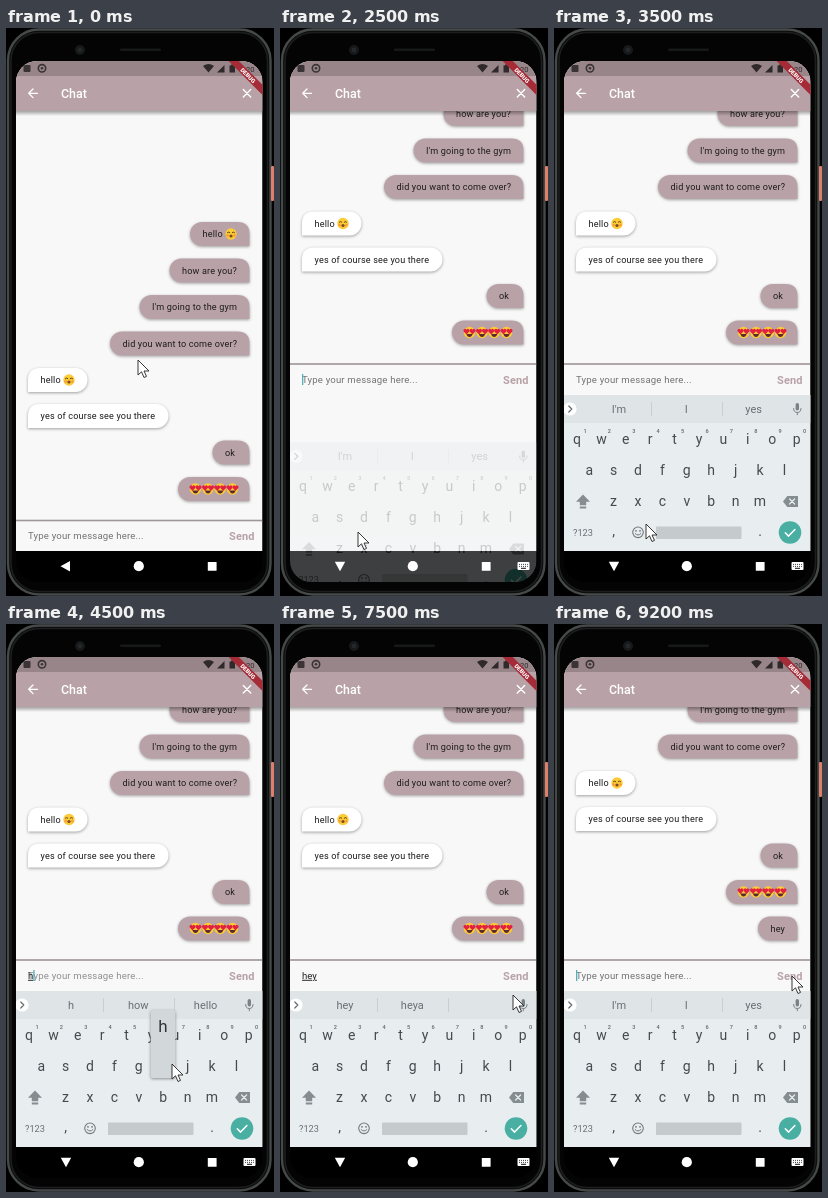
These frames come from a looping animation (268x568 px, 9300 ms). An HTML page:

```html
<!DOCTYPE html>
<html lang="en">
<head>
<meta charset="utf-8">
<title>Chat on a phone</title>
<style>
html, body { margin: 0; width: 100%; height: 100%; overflow: hidden; background: #000; }
svg { display: block; width: 268px; height: 568px; font-family: Roboto, Arial, sans-serif; }
.msg { font-size: 9.1px; letter-spacing: .16px; fill: #1d1b1c; }
.bubble { filter: drop-shadow(0 1.8px 1.5px rgba(0,0,0,.36)); }
.input { font-size: 9.6px; letter-spacing: .17px; }
.typed { fill: #222; text-decoration: underline; letter-spacing: 0; }
.mid { text-anchor: middle; }
.key { font-size: 14px; fill: #444b4e; }
.digit { font-size: 5.6px; fill: #62696c; font-weight: 500; }
.word { font-size: 11px; fill: #687074; }
.line { fill: none; stroke-linecap: round; stroke-linejoin: round; }
</style>
</head>
<body>
<svg id="stage" viewBox="0 0 268 568"></svg>
<script>
const LOOP = 9300, STEP = 100, LIFT = 156.5, ROW = 36.5;
const MAUVE = '#b8a2a8';
const stage = document.getElementById('stage');

// [time, x, y] of the mouse pointer
const POINTER = [
  [400, 132, 332], [500, 118, 375], [600, 92, 460], [700, 80, 516], [1200, 80, 516],
  [1400, 78, 504], [3400, 78, 504], [3500, 92, 496], [3700, 155, 447], [3800, 166, 440],
  [4500, 166, 440], [4600, 132, 428], [4800, 80, 412], [5700, 80, 412], [6000, 148, 411],
  [6100, 148, 411], [6200, 146, 409], [6800, 146, 409], [7300, 214, 385], [7400, 214, 385],
  [7500, 233, 371], [7700, 242, 357], [7800, 242, 357], [7900, 238, 352]
];
// [fade-in start, fade-out start] of the text caret
const CARET = [[1900, 3100], [3500, 4100], [4400, 5000], [5200, 6000], [6400, 7000], [7500, 7900], [8400, 9900]];
// [time, typed text, suggestions]
const TYPING = [
  [0, '', ["I'm", 'I', 'yes']],
  [4500, 'h', ['h', 'how', 'hello']],
  [5400, 'he', ['he', 'hello', 'hey']],
  [6600, 'hey', ['hey', 'heya', '']],
  [8500, '', ["I'm", 'I', 'yes']]
];
// [key, x, y, shown from, shown until]
const PRESSES = [['h', 157, 442, 4400, 4600], ['e', 71.5, 411, 5200, 5500], ['y', 145, 411, 6400, 6700]];

const clamp = v => Math.max(0, Math.min(1, v));
const ramp = (t, a, b) => clamp((t - a) / (b - a));
const text = (x, y, s, cls, extra = '') => `<text x="${x}" y="${y}" class="${cls}" ${extra}>${s}</text>`;
const rect = (x, y, w, h, fill, extra = '') => `<rect x="${x}" y="${y}" width="${w}" height="${h}" fill="${fill}" ${extra}/>`;
const dot = (x, y, r, fill, extra = '') => `<circle cx="${x}" cy="${y}" r="${r}" fill="${fill}" ${extra}/>`;
const path = (d, fill, extra = '') => `<path d="${d}" fill="${fill}" ${extra}/>`;
const stroke = (d, color, w) => `<path d="${d}" class="line" stroke="${color}" stroke-width="${w}"/>`;
const group = (attrs, body) => `<g ${attrs}>${body}</g>`;

function pointerAt(t) {
  const i = POINTER.findIndex(p => p[0] >= t);
  if (i < 0) return POINTER.at(-1).slice(1);
  if (i === 0) return POINTER[0].slice(1);
  const [a, x0, y0] = POINTER[i - 1], [b, x1, y1] = POINTER[i];
  const k = ramp(t, a, b);
  return [x0 + (x1 - x0) * k, y0 + (y1 - y0) * k];
}

const face = (x, y, body) => group(`transform="translate(${x} ${y})"`, dot(0, 0, 5.7, '#fccb35') + body);
const kiss = (x, y) => face(x, y,
  stroke('M-3.6 -1.4q1.2 -1.2 2.4 0M1.2 -1.4q1.2 -1.2 2.4 0', '#5b4124', 1) +
  dot(-3.4, 1.6, 1.4, '#f7a03a') + dot(3.4, 1.6, 1.4, '#f7a03a') +
  dot(0, 2, 1.6, '#7d4a24'));
const heart = x => path(`M${x} 2l-2.8 -3a1.5 1.5 0 0 1 2.8 -1.8a1.5 1.5 0 0 1 2.8 1.8z`, '#e2203f');
const love = (x, y) => face(x, y, heart(-3) + heart(3) + path('M-3 1.6h6q-.6 3 -3 3t-3 -3z', '#5a2a30'));

function bubble(x0, x1, y, words, mine, emoji = '') {
  const t = y - 12, b = y + 12;
  const d = mine
    ? `M${x0 + 12} ${t}H${x1 - 12}q12 0 12 12V${b}H${x0 + 12}a12 12 0 0 1 0 -24z`
    : `M${x0 + 12} ${t}H${x1 - 12}a12 12 0 0 1 0 24H${x0}V${y}q0 -12 12 -12z`;
  return path(d, mine ? MAUVE : '#fff', 'class="bubble"') + text(x0 + 12.5, y + 3.2, words, 'msg') + emoji;
}

const MESSAGES =
  bubble(184, 243.5, 206, 'hello', true, kiss(225, 206)) +
  bubble(163.5, 243.5, 242.5, 'how are you?', true) +
  bubble(133.5, 243.5, 279, 'I\'m going to the gym', true) +
  bubble(104, 243.5, 315.5, 'did you want to come over?', true) +
  bubble(22, 81.5, 352, 'hello', false, kiss(63, 352)) +
  bubble(22, 162.5, 388, 'yes of course see you there', false) +
  bubble(206.5, 243.5, 424.5, 'ok', true) +
  bubble(172, 243.5, 461, '', true, [189.5, 202, 214.2, 226.5].map(x => love(x, 461)).join(''));
const REPLY = bubble(204, 243.5, 461, 'hey', true);

const DEFS = `<defs>
  <clipPath id="screen"><rect x="10" y="33" width="246.5" height="521" rx="21"/></clipPath>
  <clipPath id="body"><rect x="10" y="83" width="246.5" height="440"/></clipPath>
  <linearGradient id="shade" x2="0" y2="1"><stop stop-opacity=".34"/><stop offset="1" stop-opacity="0"/></linearGradient>
</defs>`;

const PHONE = rect(0, 0, 268, 568, '#000') +
  rect(2, 1.5, 262.5, 565, '#0a0b0b', 'rx="31" stroke="#464949" stroke-width="2.4"') +
  rect(5, 4.5, 256.5, 559, '#040404', 'rx="28" stroke="#1d1e1e" stroke-width="1.6"') +
  dot(74, 22, 5, '#17191a') + dot(74, 22, 2.4, '#24282b') +
  rect(114, 20.5, 41, 2.5, '#171818', 'rx="1.2"') +
  rect(265, 138, 3, 35, '#dd7f6a', 'rx="1"');

const TOP_BAR = rect(10, 83, 246.5, 5, 'url(#shade)') +
  rect(10, 33, 246.5, 15, '#988589') + rect(10, 48, 246.5, 35, MAUVE) +
  rect(17.5, 37, 7, 7, '#3b3436', 'rx="1"') +
  dot(36, 40.3, 3.7, 'none', 'stroke="#3b3436" stroke-width="1.6"') + dot(36, 40.3, 1.3, '#3b3436') +
  path('M202.5 44.5l-5.5 -6.4q5.5 -4 11 0z', '#2f292b') +
  path('M211 44.5h7.5v-7.5z', '#2f292b') +
  path('M223.5 37.5h1.5v-1h2.5v1h1.5v7h-5.5z', '#2f292b') +
  text(234, 43.5, '5:20', '', 'font-size="7.6" fill="#2f292b"') +
  group('transform="translate(256.5 33) rotate(45)"',
    rect(-30, 16.8, 60, 7.2, '#a52b37') +
    text(0, 22.6, 'DEBUG', 'mid', 'font-size="5.8" font-weight="800" fill="#fff"')) +
  stroke('M31.5 65.3H22.8M27 61L22.7 65.3L27 69.6', '#fff', 1.3) +
  text(55, 69.8, 'Chat', '', 'font-size="12.4" font-weight="500" fill="#fff"') +
  stroke('M237.3 61.5l7.4 7.4M244.7 61.5l-7.4 7.4', '#fff', 1.4);

function keyRow(keys, x, y, digits) {
  return [...keys].map((k, i) => {
    const cx = x + i * 24.4;
    return text(cx, y + 4.5, k, 'key mid') + (digits ? text(cx + 8, y - 6, (i + 1) % 10, 'digit mid') : '');
  }).join('');
}

const KEYS = rect(10, 367, 246.5, 156, '#e8edef') + rect(10, 367, 246.5, 28, '#dfe4e7') +
  dot(16, 381, 6.6, '#fff') + stroke('M14.8 378l3 3l-3 3', '#666d70', 1.2) +
  rect(97, 374, .8, 14, '#c3c9cc') + rect(168, 374, .8, 14, '#c3c9cc') +
  rect(241.6, 375, 3.4, 7.5, '#7b8285', 'rx="1.7"') +
  stroke('M239.6 380.5q0 4 3.7 4t3.7 -4M243.3 384.5v2.3', '#7b8285', 1) +
  keyRow('qwertyuiop', 23, 411, true) + keyRow('asdfghjkl', 35.2, 442) + keyRow('zxcvbnm', 59.6, 473) +
  path('M29 466.5l7 7.2h-3.8v3.6h-6.4v-3.6h-3.8zM25.8 478.6h6.4v1.8h-6.4z', '#868d90') +
  path('M229 473.5l4.3 -5.5h10.7v11h-10.7z', '#868d90') +
  stroke('M235.6 471l5 5M240.6 471l-5 5', '#e8edef', 1.2) +
  text(29, 507.8, '?123', 'mid', 'font-size="9.2" fill="#687074"') +
  text(59.6, 508, ',', 'key mid') + text(206, 508, '.', 'key mid') +
  dot(84, 504.3, 5.3, 'none', 'stroke="#71787b" stroke-width="1.1"') +
  dot(82, 502.8, .9, '#71787b') + dot(86, 502.8, .9, '#71787b') + stroke('M81.2 505.6q2.8 3 5.6 0', '#71787b', 1) +
  rect(102, 498.5, 85.5, 12.5, '#c5cacc', 'rx="1"') +
  dot(236, 504.5, 11.3, '#4aafa3') + stroke('M231.3 504.8l3.3 3.3l6.3 -6.6', '#fff', 1.5);

function popup([k, x, y, from, until], t) {
  if (t < from || t > until) return '';
  return rect(x - 12.3, y - 56, 24.6, 68, '#d2d8da', 'rx="2" style="filter:drop-shadow(0 1px 1.5px rgba(0,0,0,.4))"') +
    text(x, y - 34.5, k, 'key mid', 'style="font-size:17px;fill:#2f3537"');
}

function chat(t, typed) {
  const sent = t >= 8500;
  const hint = t < 8000 ? 1 - ramp(t, 4450, 4680) : ramp(t, 8400, 8700);
  const caret = Math.max(...CARET.map(([on, off]) => Math.min(ramp(t, on, on + 100), 1 - ramp(t, off - 100, off + 100))));
  return group('clip-path="url(#body)"', group(`transform="translate(0 ${t >= 2500 ? -LIFT : 0})"`,
    group(`transform="translate(0 ${sent ? -ROW : 0})"`, MESSAGES) + (sent ? REPLY : '') +
    rect(10, 491.7, 246.5, 1.6, '#a0959a') +
    text(22, 511.3, 'Type your message here...', 'input', `fill="#737373" opacity="${hint}"`) +
    text(22, 511.3, typed, 'input typed') +
    rect(22 + typed.length * 5.3, 502.5, 1.3, 11, '#57aebb', `opacity="${caret}"`) +
    text(223, 512, 'Send', '', `font-size="11" font-weight="700" letter-spacing=".15" fill="${MAUVE}"`)));
}

function keyboard(t, words) {
  if (t < 2500) return '';
  const k = ramp(t, 2400, 2850), drop = 61 * (1 - k);
  return group(`transform="translate(0 ${drop})" opacity="${clamp(k * 1.2)}"`,
    KEYS + words.map((w, i) => text(65 + i * 67.3, 385, w, 'word mid')).join(''));
}

function navIcons(open) {
  const keyboardIcon = rect(237.5, 534, 12, 8, '#fff', 'rx="1"') +
    stroke('M239.5 536.4h8M239.5 538.4h8', '#111', '.9" stroke-dasharray=".1 1.9') + rect(241, 539.8, 5, 1, '#111');
  return path(open ? 'M54.8 533.8h10.4l-5.2 9.5z' : 'M54.5 538.3l9.5 -5.2v10.4z', '#fff') +
    dot(132.8, 538.2, 5.1, '#fff') + rect(201.8, 534, 8.8, 8.8, '#fff', 'rx=".6"') + (open ? keyboardIcon : '');
}

function draw(t) {
  const [, typed, words] = TYPING.findLast(s => s[0] <= t);
  const [x, y] = pointerAt(t);
  stage.innerHTML = DEFS + PHONE + group('clip-path="url(#screen)"',
    rect(10, 33, 246.5, 490, '#f8f8f8') + chat(t, typed) + TOP_BAR +
    rect(10, 523, 246.5, 31, '#000') + keyboard(t, words) +
    PRESSES.map(p => popup(p, t)).join('') + navIcons(t >= 2000)) +
    path('M0 0V15L3.5 11.8L6 17.5L8.5 16.4L6 11H11Z', '#fff',
      `transform="translate(${x} ${y})" stroke="#222" stroke-width=".9" stroke-linejoin="round"`);
}

const start = performance.now();
let last = -1;
function tick() {
  const t = Math.floor(((performance.now() - start) % LOOP) / STEP) * STEP;
  if (t !== last) draw(last = t);
  requestAnimationFrame(tick);
}
tick();
</script>
</body>
</html>
```
